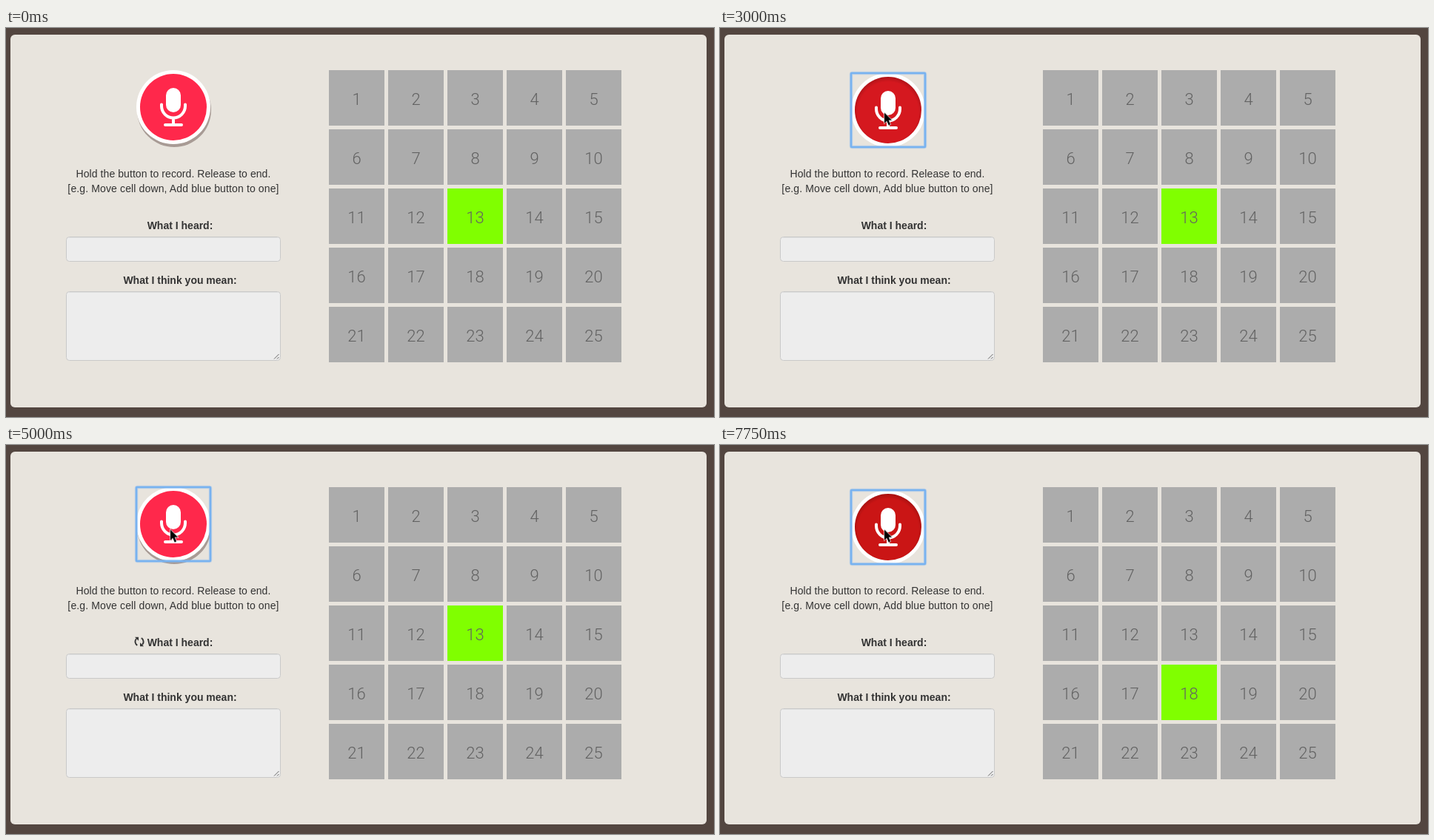
An HTML page for the animation above (8000 ms loop, 956x526 px).

```html
<!DOCTYPE html>
<html lang="en">
<head>
<meta charset="utf-8">
<title>Voice grid</title>
<style>
  html, body { margin: 0; width: 100%; height: 100%; overflow: hidden; background: #534640; }
  svg { display: block; }
  text { font: 14px "Liberation Sans", Arial, sans-serif; fill: #333; white-space: pre; }
  .mid { text-anchor: middle; }
  .bold { font-weight: bold; }
  .typed { fill: #555; letter-spacing: .1px; }
  .field { fill: #ededed; stroke: #c9c9c9; }
  .cell { fill: #acacac; }
  .num { font: 300 22px Roboto, "Liberation Sans", sans-serif; fill: #626262; text-anchor: middle; }

  /* One 8 s timeline, cut hard every 250 ms */
  .cursor, .button, .face, .inner, .drop, .ring, .wait1, .wait2, .heard, .meant, .active {
    animation: 8s step-end infinite;
  }
  .cursor { animation-name: cursor; }
  .button { animation-name: press; }
  .face { animation-name: face; }
  .inner { animation-name: inner; }
  .drop { animation-name: drop; }
  .ring { animation-name: ring; }
  .wait1 { animation-name: wait1; }
  .wait2 { animation-name: wait2; }
  .heard { animation-name: heard; }
  .meant { animation-name: meant; }
  .active { animation-name: active; }
  .spin { animation: spin 2s steps(8) infinite; }

  @keyframes cursor {
    0% { transform: translate(218px, 120px); opacity: 0; }
    6.25% { transform: translate(218px, 120px); opacity: 1; }
    9.375% { transform: translate(215px, 134px); }
    12.5% { transform: translate(216px, 131px); }
    18.75% { transform: translate(244px, 148px); }
    21.875% { transform: translate(270px, 164px); }
    28.125% { transform: translate(237px, 131px); }
    31.25%, 100% { transform: translate(222px, 114.5px); opacity: 1; }
  }
  @keyframes press {
    0%, 53.125% { transform: none; }
    37.5%, 87.5%, 100% { transform: translate(1px, 4px); }
  }
  @keyframes face {
    0%, 53.125% { fill: #ff284b; }
    37.5%, 87.5% { fill: #d5181f; }
    40.625%, 90.625%, 100% { fill: #ca1515; }
  }
  @keyframes inner {
    0%, 53.125% { opacity: 0; }
    37.5%, 87.5%, 100% { opacity: 1; }
  }
  @keyframes drop {
    0%, 53.125% { opacity: 1; }
    37.5%, 87.5%, 100% { opacity: 0; }
  }
  @keyframes ring { 0% { opacity: 0; } 37.5%, 100% { opacity: 1; } }
  @keyframes wait1 { 0%, 68.75%, 100% { opacity: 0; } 53.125% { opacity: 1; } }
  @keyframes wait2 { 0%, 75%, 100% { opacity: 0; } 68.75% { opacity: 1; } }
  @keyframes heard { 0%, 87.5%, 100% { opacity: 0; } 68.75% { opacity: 1; } }
  @keyframes meant { 0%, 87.5%, 100% { opacity: 0; } 75% { opacity: 1; } }
  @keyframes active { 0% { transform: none; } 75%, 100% { transform: translateY(80px); } }
  @keyframes spin { to { transform: rotate(360deg); } }
</style>
</head>
<body>
<svg width="956" height="526" viewBox="0 0 956 526">
  <defs>
    <radialGradient id="inset" cy=".53" r=".53">
      <stop offset=".86" stop-color="#000" stop-opacity="0"/>
      <stop offset="1" stop-color="#000" stop-opacity=".18"/>
    </radialGradient>
    <g id="refresh" fill="#333">
      <path d="M2.75-4.9A5.6 5.6 0 0 1 3.9 4M-2.75 4.9A5.6 5.6 0 0 1-3.9-4" fill="none" stroke="#333" stroke-width="1.9"/>
      <path d="M1 1.2V6.2H6ZM-1-1.2V-6.2H-6Z"/>
    </g>
  </defs>

  <rect width="956" height="526" fill="#534640"/>
  <rect x="6" y="9" width="940" height="504" rx="6" fill="#e8e4dd"/>

  <g class="button">
    <circle class="drop" cx="227" cy="111" r="50" fill="#a89b95"/>
    <circle cx="226" cy="107" r="50" fill="#fff"/>
    <circle class="face" cx="226" cy="107" r="45"/>
    <circle class="inner" cx="226" cy="107" r="45" fill="url(#inset)"/>
    <rect x="216" y="81" width="20" height="33" rx="10" fill="#fff"/>
    <path d="M210 103.500V105.500A16 16 0 0 0 242 105.500V103.500M226 121.500V131M215 131H237"
      fill="none" stroke="#fff" stroke-width="4" stroke-linecap="round"/>
    <g class="ring" fill="none" stroke="#78b2f0">
      <rect x="176" y="57" width="100" height="100" rx="1.500" stroke-width="4.500" opacity=".35"/>
      <rect x="176" y="57" width="100" height="100" rx="1" stroke-width="2.600"/>
    </g>
  </g>

  <text class="mid" x="226" y="202" letter-spacing=".07">Hold the button to record. Release to end.</text>
  <text class="mid" x="226" y="222" letter-spacing=".13">[e.g. Move cell down, Add blue button to one]</text>

  <g class="wait1"><g transform="translate(180 266)"><use class="spin" href="#refresh"/></g></g>
  <text class="mid bold" x="235" y="272">What I heard:</text>
  <rect class="field" x="81.5" y="282.5" width="289" height="33" rx="4"/>
  <path d="M84 283.500H368" stroke="#dfdfdf"/>
  <text class="typed heard" x="94" y="304">move cell down</text>

  <g class="wait2"><g transform="translate(148 341)"><use class="spin" href="#refresh"/></g></g>
  <text class="mid bold" x="235" y="346">What I think you mean:</text>
  <rect class="field" x="81.5" y="356.5" width="289" height="93" rx="4"/>
  <path d="M84 357.500H368" stroke="#dfdfdf"/>
  <path d="M362 447.500L368.500 441M366 447.500L368.500 445" stroke="#666"/>
  <g class="meant">
    <text class="typed" x="94" y="378" style="letter-spacing:0">You want me to :  [MOVE A CELL ]  [</text>
    <text class="typed" x="94" y="398">Direction: down]</text>
  </g>

  <g id="cells"></g>
  <rect class="active" x="596" y="217" width="75" height="75" fill="#80ff00"/>
  <g id="nums"></g>

  <path class="cursor" d="M0 0V14.200L3.200 11.200L5.700 17L8.200 16L5.700 10.300H10.200Z"
    fill="#000" stroke="#fff" stroke-width="1.200" paint-order="stroke"/>
</svg>
<script>
  const add = (parent, tag, attrs, label = "") => {
    const el = document.createElementNS("http://www.w3.org/2000/svg", tag);
    for (const key in attrs) el.setAttribute(key, attrs[key]);
    el.textContent = label;
    document.getElementById(parent).append(el);
  };

  for (let i = 0; i < 25; i++) {
    const x = 436 + i % 5 * 80;
    const y = 57 + Math.floor(i / 5) * 80;
    add("cells", "rect", { class: "cell", x, y, width: 75, height: 75 });
    add("nums", "text", { class: "num", x: x + 37.5, y: y + 46.5 }, i + 1);
  }
</script>
</body>
</html>
```
